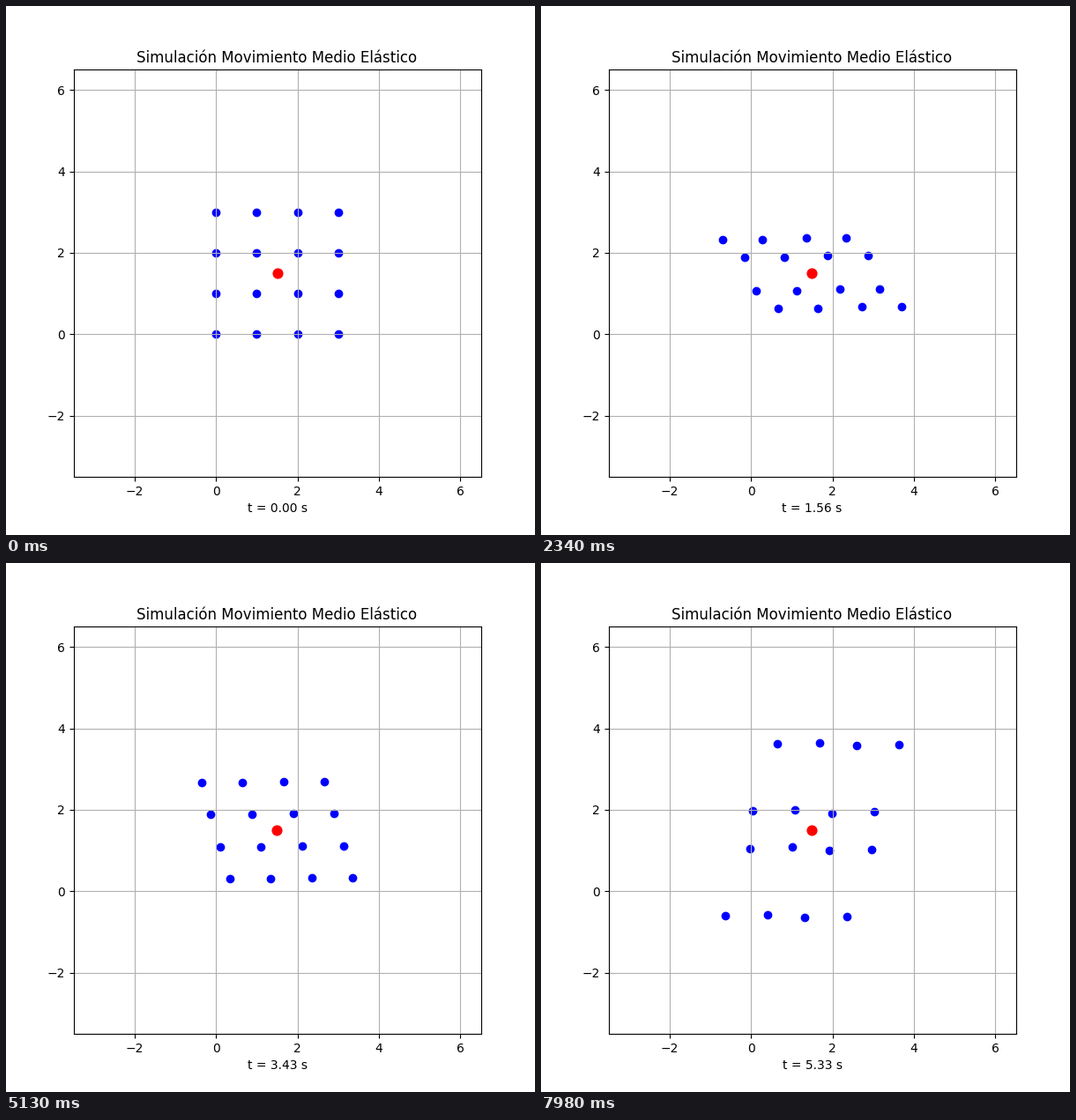
Recreate the animation shown at these times as a matplotlib script. Size 600 by 600 pixels, loop 8 s.

```python
import numpy as np
import matplotlib.pyplot as plt
from matplotlib.animation import FuncAnimation

FRAMES = 267
LOOP_MS = 8000
DT = 10 / 499

# Antisymmetric normal modes of a free chain of four unit masses
nodes = np.arange(4)
modes = np.array([-np.cos(k * np.pi * (nodes + 0.5) / 4) for k in (1, 3)])
modes[1] *= 1
omega = 2 * np.sin(np.array([1, 3]) * np.pi / 8)

# Amplitude (x, y) of each mode, across the columns and across the rows
COL_AMP = np.array([[0.0281, 0.0320], [-0.0964, -0.0695]])
ROW_AMP = np.array([[-0.7377, -0.6833], [-0.5080, -0.6647]])

grid = np.stack(np.meshgrid(nodes, nodes, indexing="ij"), axis=-1).astype(float)


def positions(t):
    wave = modes * np.sin(omega * t)[:, None]
    cols = wave.T @ COL_AMP
    rows = wave.T @ ROW_AMP
    return (grid + cols[:, None] + rows[None, :]).reshape(-1, 2)


fig, ax = plt.subplots(figsize=(6, 6), dpi=100)
ax.set_aspect("equal")
ax.set_xlim(-3.5, 6.5)
ax.set_ylim(-3.5, 6.5)
ax.set_xticks(range(-2, 7, 2))
ax.set_yticks(range(-2, 7, 2))
ax.grid(True)
ax.set_title("Simulación Movimiento Medio Elástico")
label = ax.set_xlabel("t = 0.00 s")
masses = ax.scatter(*positions(0).T, c="blue")
center = ax.scatter([1.5], [1.5], c="red", s=60)


def update(n):
    t = n * DT
    masses.set_offsets(positions(t))
    # The centre of mass drifts by a hair
    center.set_offsets([[1.5 + 1e-6 * (60 - n), 1.5]])
    label.set_text(f"t = {t:.2f} s")
    return masses, center, label


anim = FuncAnimation(fig, update, frames=FRAMES, interval=LOOP_MS / FRAMES,
                     repeat=True, repeat_delay=0, blit=False)
plt.show()
```
